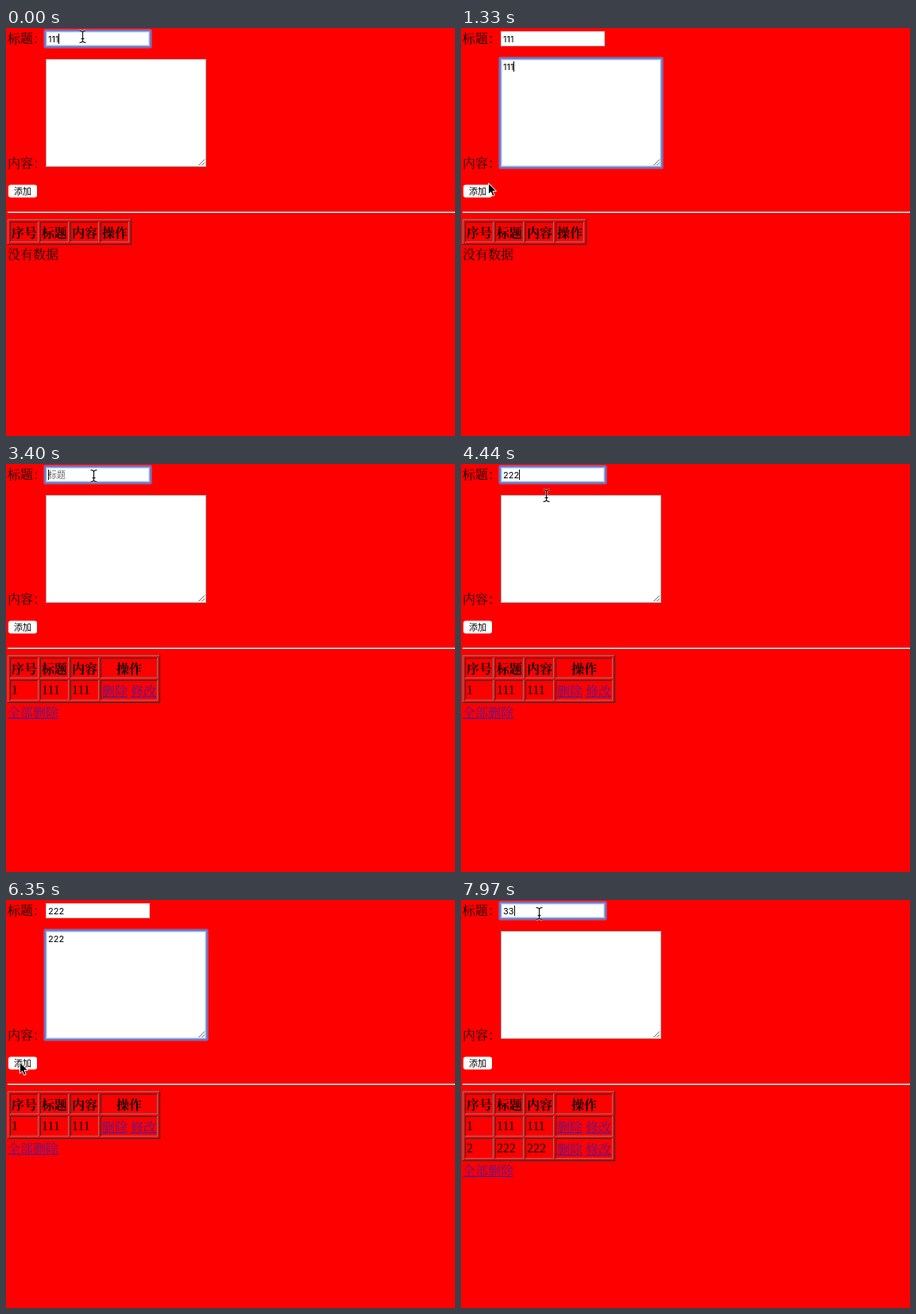
An HTML page with a canvas for the animation above (8000 ms loop, 565 by 514 pixels).

```html
<!DOCTYPE html>
<html lang="zh-CN">
<head>
<meta charset="utf-8">
<title>添加</title>
<style>
html, body { margin: 0; width: 100%; height: 100%; overflow: hidden; background: #f00; }
canvas { display: block; }
</style>
</head>
<body>
<canvas id="stage" width="565" height="514"></canvas>
<script>
const ctx = document.getElementById('stage').getContext('2d');
const LOOP = 8000, STEP = 147.5;
const SERIF = '"Liberation Serif", "Noto Serif CJK SC", "Noto Sans CJK SC", serif';
const SANS = 'Inter, "Noto Sans CJK SC", sans-serif';
const BODY = `16px ${SERIF}`, HEAD = `bold 16px ${SERIF}`, FIELD = `11px ${SANS}`;
const LINK = '#4f1b98', LIGHT = '#808080', DARK = '#2c2c2c';

// [step, focused field, title, content, rows in the table, caret visible]
const states = [
  [0, 'title', '111', '', 0, 1],
  [3, 'content', '111', '', 0, 1],
  [4, 'content', '111', '1', 0, 1],
  [5, 'content', '111', '11', 0, 1],
  [6, 'content', '111', '111', 0, 1],
  [11, 'content', '111', '111', 0, 0],
  [13, '', '', '', 1, 0],
  [23, 'title', '', '', 1, 1],
  [27, 'title', '2', '', 1, 1],
  [28, 'title', '22', '', 1, 1],
  [29, 'title', '222', '', 1, 1],
  [33, 'content', '222', '', 1, 1],
  [35, 'content', '222', '2', 1, 1],
  [36, 'content', '222', '22', 1, 1],
  [37, 'content', '222', '222', 1, 1],
  [42, 'content', '222', '222', 1, 0],
  [44, '', '', '', 2, 0],
  [51, 'title', '', '', 2, 1],
  [53, 'title', '3', '', 2, 1],
  [54, 'title', '33', '', 2, 1],
];

// Pointer path: [step, x, y]
const path = [
  [0, 96, 11], [2, 104, 75], [6, 104, 75], [8, 52, 184], [9, 34, 195], [10, 22, 206],
  [15, 22, 206], [17, 95, 140], [19, 178, 52], [21, 110, 15],
  [29, 110, 15], [32, 102, 91], [37, 102, 91], [41, 22, 195], [42, 17, 202], [43, 17, 204],
  [44, 17, 204], [46, 66, 105], [48, 98, 17],
];

const lastAt = (list, step) => list.findLastIndex(item => item[0] <= step);

function pointerAt(step) {
  const i = lastAt(path, step), [s0, x0, y0] = path[i];
  const [s1, x1, y1] = path[i + 1] || [s0 + 1, x0, y0];
  const k = (step - s0) / (s1 - s0);
  return [Math.round(x0 + (x1 - x0) * k), Math.round(y0 + (y1 - y0) * k)];
}

function rect(x, y, w, h, color) {
  ctx.fillStyle = color;
  ctx.fillRect(x, y, w, h);
}

function text(str, x, y, font = BODY, color = '#000') {
  ctx.font = font;
  ctx.fillStyle = color;
  ctx.fillText(str, x, y);
}

function link(str, x, y) {
  text(str, x, y, BODY, LINK);
  rect(x, y + 1, 16 * str.length, 1, LINK);
}

function bevel(x, y, w, h, topLeft, bottomRight) {
  rect(x, y, w, 1, topLeft);
  rect(x, y, 1, h, topLeft);
  rect(x, y + h - 1, w, 1, bottomRight);
  rect(x + w - 1, y, 1, h, bottomRight);
}

function line(points, color, width) {
  ctx.strokeStyle = color;
  ctx.lineWidth = width;
  ctx.beginPath();
  points.forEach(([x, y]) => ctx.lineTo(x, y));
  ctx.stroke();
}

function field(x, y, w, h, value, focused, caret, border) {
  if (focused) {
    ctx.fillStyle = 'rgba(90, 150, 235, .45)';
    for (const grow of [3, 2, 1]) {
      ctx.beginPath();
      ctx.roundRect(x - grow, y - grow, w + 2 * grow, h + 2 * grow, grow);
      ctx.fill();
    }
  }
  rect(x, y, w, h, focused ? '#83b4f0' : border);
  rect(x + 1, y + 1, w - 2, h - 2, focused ? '#d3e5fb' : '#fff');
  rect(x + 2, y + 2, w - 4, h - 4, '#fff');
  text(value, x + 3, y + 14, FIELD);
  if (focused && caret) rect(Math.round(x + 3 + ctx.measureText(value).width), y + 3, 1, 13, '#000');
}

function table(rows) {
  const lastWidth = rows ? 72 : 36;
  const headers = ['序号', '标题', '内容', '操作'];
  bevel(2, 241, 120 + lastWidth, 32 + 28 * rows, LIGHT, DARK);
  for (let row = 0; row <= rows; row++) {
    const y = 244 + 28 * row, value = String(row).repeat(3);
    headers.forEach((header, col) => {
      const x = 5 + 38 * col, w = col < 3 ? 36 : lastWidth;
      bevel(x, y, w, 26, DARK, LIGHT);
      if (!row) text(header, x + w / 2 - 16, 264, HEAD);
      else if (col < 3) text(col ? value : row, x + 2, y + 46 - 0 - 0 - 0 - 0 - 28, BODY);
    });
    if (row) {
      link('删除', 121, y + 20);
      link('修改', 157, y + 20);
    }
  }
  if (rows) link('全部删除', 2, 291 + 28 * rows);
  else text('没有数据', 2, 291);
}

function pointer(x, y) {
  const inside = (l, t, r, b) => x >= l && x < r && y >= t && y < b;
  ctx.save();
  ctx.translate(x, y);
  if (inside(50, 4, 181, 23) || inside(50, 39, 252, 175)) {
    for (const [color, width] of [['rgba(255,255,255,.6)', 2.5], ['#111', 1.2]]) {
      line([[-3.5, -7.5], [-1.5, -7.2], [.5, -6], [2.5, -7.2], [4.5, -7.5]], color, width);
      line([[-3.5, 7.5], [-1.5, 7.2], [.5, 6], [2.5, 7.2], [4.5, 7.5]], color, width);
      line([[.5, -6], [.5, 6]], color, width);
      line([[-1.5, 2.5], [2.5, 2.5]], color, width);
    }
  } else {
    const arrow = new Path2D('M.5 .5V14.5L3.6 11.6 5.7 16.7 8.2 15.6 6 10.6H10.6Z');
    ctx.fillStyle = '#000';
    ctx.fill(arrow);
    ctx.strokeStyle = '#fff';
    ctx.lineWidth = 1;
    ctx.stroke(arrow);
  }
  ctx.restore();
}

function draw(time) {
  const step = Math.floor((time % LOOP) / STEP);
  const [, focus, title, content, rows, caret] = states[lastAt(states, step)];

  rect(0, 0, 565, 514, '#f00');
  text('标题：', 2, 19);
  text('内容：', 2, 176);
  field(50, 4, 131, 19, title, focus === 'title', caret, '#ccc');
  if (!title) text('标题', 53, 18, FIELD, '#666');
  field(50, 39, 202, 136, content, focus === 'content', caret, '#a9a9a9');
  line([[242.5, 173], [250, 165.5]], '#555', 1);
  line([[246.5, 173], [250, 169.5]], '#555', 1);

  ctx.fillStyle = '#fff';
  ctx.beginPath();
  ctx.roundRect(3, 197.5, 36, 16, 3);
  ctx.fill();
  text('添加', 10, 210, FIELD);

  rect(2, 231, 563, 1, '#9a9a9a');
  rect(2, 232, 563, 1, '#eee');
  table(rows);
  pointer(...pointerAt(step));
}

function frame() {
  draw(performance.now());
  requestAnimationFrame(frame);
}
frame();
</script>
</body>
</html>
```
